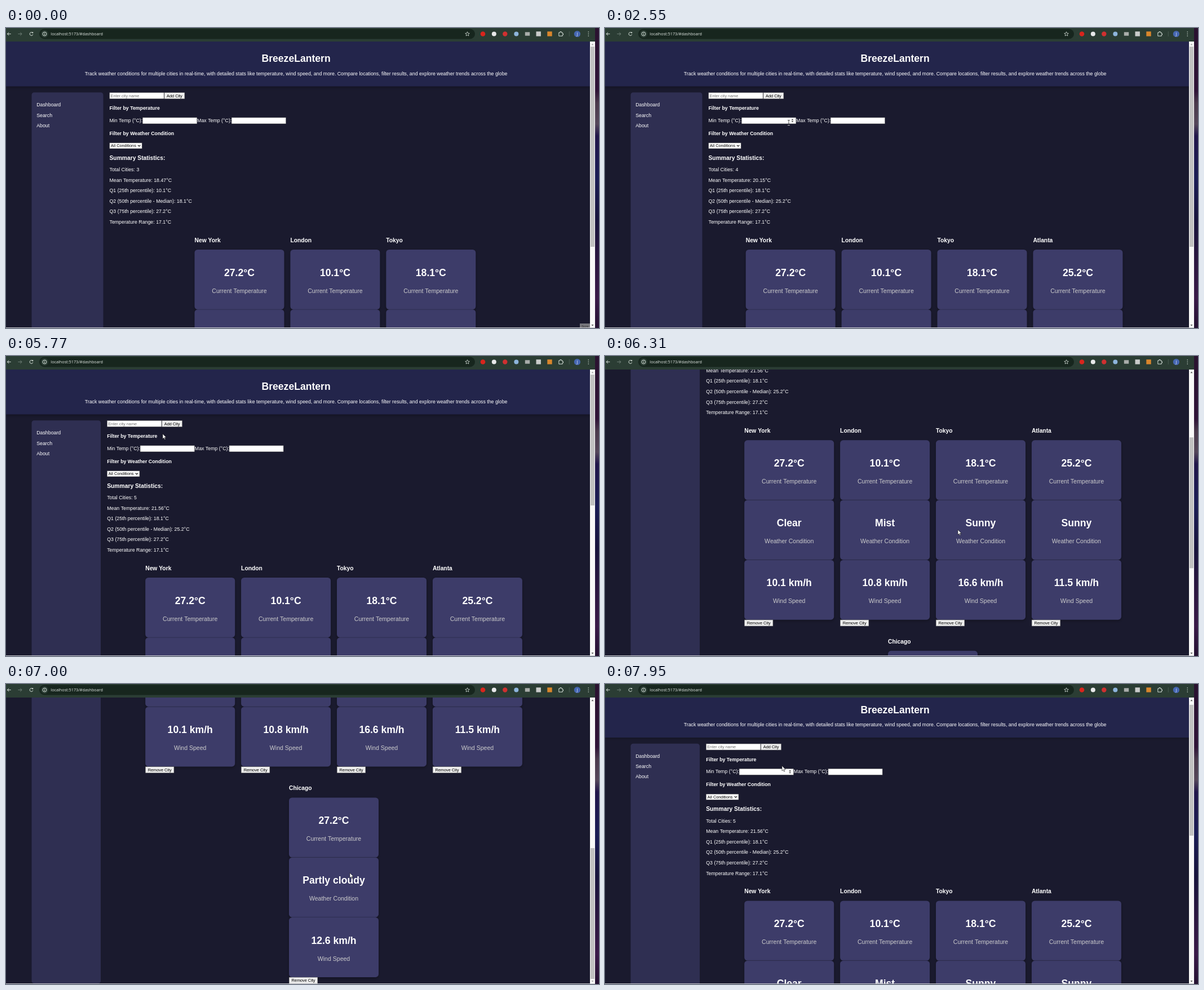
These frames come from a looping animation (1052 by 532 pixels, 8 s). An HTML page with a canvas:

```html
<!DOCTYPE html>
<html lang="en">
<head>
<meta charset="utf-8">
<title>Weather dashboard</title>
<style>
html, body { margin: 0; width: 100%; height: 100%; overflow: hidden; background: #1a1a2e; }
canvas { display: block; width: 1052px; height: 532px; }
</style>
</head>
<body>
<canvas id="stage"></canvas>
<script>
const W = 1052, H = 532, LOOP = 8000, TOP = 24, PAGE_W = 1036;
const canvas = document.getElementById('stage');
const ctx = canvas.getContext('2d');
const dpr = window.devicePixelRatio || 1;
canvas.width = W * dpr;
canvas.height = H * dpr;

const SANS = '"Liberation Sans", Arial, sans-serif';
const UI = '"Open Sans", "Noto Sans", sans-serif';

const cities = [
  ['New York', '27.2°C', 'Clear', '10.1 km/h'],
  ['London', '10.1°C', 'Mist', '10.8 km/h'],
  ['Tokyo', '18.1°C', 'Sunny', '16.6 km/h'],
  ['Atlanta', '25.2°C', 'Sunny', '11.5 km/h'],
  ['Chicago', '27.2°C', 'Partly cloudy', '12.6 km/h']
];
const labels = ['Current Temperature', 'Weather Condition', 'Wind Speed'];
const layouts = {
  3: { left: 183.5, side: 127, cards: 334.5, mean: '18.47', q1: '10.1', q2: '18.1', thumb: 355 },
  4: { left: 183.5, side: 127, cards: 249.7, mean: '20.15', q1: '18.1', q2: '25.2', thumb: 355 },
  5: { left: 179.2, side: 122.5, cards: 247.2, mean: '21.56', q1: '18.1', q2: '25.2', thumb: 232 }
};

// Screen refreshes come in bursts: [start, end, steps]
const bursts = [[70, 830, 12], [900, 1240, 5], [2160, 2550, 4], [2950, 3010, 2],
  [3150, 3910, 12], [4980, 5370, 4], [5770, 6510, 12], [6580, 7000, 7], [7270, 7950, 11]];
const scrollKeys = [[5820, 0], [6308, 243.6], [6510, 380], [6580, 420], [7000, 565], [7230, 565],
  [7542, 290.5], [7950, 8.5]];
const cursorKeys = [[0, 1030, 540], [70, 1012, 500], [480, 520, 250], [760, 232, 119], [830, 236, 121],
  [900, 245, 124], [1070, 380, 150], [1240, 326, 168], [2900, 326, 168], [2950, 365, 174],
  [3010, 428, 178], [3150, 420, 160], [3357, 330, 12], [3495, 265, 14], [3702, 235, 118],
  [3771, 238, 120], [3910, 278, 138], [5770, 278, 138], [6308, 626, 308], [6510, 622, 318],
  [7000, 610, 335], [7230, 610, 335], [7542, 575, 339], [7746, 450, 260], [7950, 314, 145]];
const typing = [[0, ''], [1380, 'a'], [1640, 'at'], [1770, 'atl'], [1900, 'atla'], [2160, ''],
  [4240, 'c'], [4330, 'ch'], [4420, 'chi'], [4840, 'chic'], [4980, '']];

function held(t) {
  let h = 0;
  for (const [start, end, n] of bursts) {
    if (t < start) break;
    const gap = (end - start) / (n - 1);
    h = start + gap * Math.min(n - 1, Math.floor((t - start) / gap + 1e-6));
  }
  return h;
}

function at(keys, t, i = 1) {
  let a = keys[0];
  for (const b of keys) {
    if (t < b[0]) {
      return b === a ? a[i] : a[i] + (b[i] - a[i]) * (t - a[0]) / (b[0] - a[0]);
    }
    a = b;
  }
  return a[i];
}

const last = (keys, t) => keys.filter(k => k[0] <= t).pop()[1];

function text(s, x, y, size = 8.8, color = '#fff', weight = 400, align = 'left', family = SANS) {
  ctx.font = `${weight} ${size}px ${family}`;
  ctx.fillStyle = color;
  ctx.textAlign = align;
  ctx.fillText(s, x, y);
}

function rect(x, y, w, h, color) {
  ctx.fillStyle = color;
  ctx.fillRect(x, y, w, h);
}

function round(x, y, w, h, r, color) {
  ctx.fillStyle = color;
  ctx.beginPath();
  ctx.roundRect(x, y, w, h, r);
  ctx.fill();
}

function disc(x, y, r, color) {
  ctx.fillStyle = color;
  ctx.beginPath();
  ctx.arc(x, y, r, 0, Math.PI * 2);
  ctx.fill();
}

function line(points, color, width = 1, close = false) {
  ctx.strokeStyle = color;
  ctx.lineWidth = width;
  ctx.beginPath();
  points.forEach(([x, y]) => ctx.lineTo(x, y));
  if (close) ctx.closePath();
  ctx.stroke();
}

function ring(x, y, r, color, from = 0, to = Math.PI * 2) {
  ctx.strokeStyle = color;
  ctx.lineWidth = 1;
  ctx.beginPath();
  ctx.arc(x, y, r, from, to);
  ctx.stroke();
}

function triangle(x, y, w, h, color) {
  ctx.fillStyle = color;
  ctx.beginPath();
  ctx.moveTo(x - w, y);
  ctx.lineTo(x + w, y);
  ctx.lineTo(x, y + h);
  ctx.fill();
}

function shadow(color, blur, dy) {
  ctx.shadowColor = color;
  ctx.shadowBlur = blur * dpr;
  ctx.shadowOffsetY = dy * dpr;
}

function box(x, y, w, h, fill = '#fff') {
  rect(x, y, w, h, '#767676');
  rect(x + .6, y + .6, w - 1.2, h - 1.2, fill);
}

function button(s, x, y, w, h = 11.5) {
  box(x, y, w, h, '#efefef');
  text(s, x + w / 2, y + 8.4, 7.33, '#000', 400, 'center');
}

function card(x, y, value, label) {
  shadow('rgba(0,0,0,.3)', 5, 2);
  round(x, y, 159, 106, 5.5, '#3d3c69');
  shadow('transparent', 0, 0);
  text(value, x + 79.5, y + 46.7, 17.6, '#fff', 700, 'center');
  text(label, x + 79.5, y + 76.7, 10.56, '#ccc', 400, 'center');
}

function cityColumn(city, x, y) {
  text(city[0], x, y, 10.3, '#fff', 700);
  labels.forEach((label, i) => card(x, y + 13.2 + i * 106.2, city[i + 1], label));
  button('Remove City', x, y + 331.6, 51);
}

function page(count, scroll, cur, typed, focused) {
  const lay = layouts[count], x = lay.left;
  ctx.save();
  ctx.beginPath();
  ctx.rect(0, TOP, PAGE_W, H - TOP);
  ctx.clip();
  rect(0, TOP, PAGE_W, H, '#1a1a2e');
  ctx.translate(0, -scroll);

  shadow('rgba(0,0,0,.25)', 5, 2);
  rect(0, TOP, PAGE_W, 79.5, '#23254b');
  shadow('transparent', 0, 0);
  text('BreezeLantern', 514.6, 60, 17.6, '#fff', 700, 'center');
  text('Track weather conditions for multiple cities in real-time, with detailed stats like temperature, ' +
    'wind speed, and more. Compare locations, filter results, and explore weather trends across the globe',
    514.6, 83.6, 8.8, '#fff', 400, 'center');

  round(45.5, 114.3, lay.side, count === 5 ? 981.7 : 600, 4.5, '#2f2f52');
  ['Dashboard', 'Search', 'About'].forEach((s, i) => text(s, 54.2, 139.4 + i * 18.1));

  if (focused) round(x - 1, 113.3, 99, 13.2, 1.5, '#fff');
  box(x, 114.3, 97, 11.4);
  text(typed || 'Enter city name', x + 2, 122.6, 7.33, typed ? '#000' : '#757575');
  button('Add City', x + 97.2, 114.3, 36.4);

  text('Filter by Temperature', x, 145, 8.8, '#fff', 700);
  text('Min Temp (°C):', x, 166.8);
  box(x + 58.7, 158.6, 96.8, 11.4);
  text('Max Temp (°C):', x + 155.6, 166.8);
  box(x + 216.5, 158.6, 96.8, 11.4);
  const cy = cur.y + scroll;
  if (cur.x > x + 59 && cur.x < x + 155 && cy > 152 && cy < 170) {
    triangle(x + 149, 163.4, 1.9, -2.3, '#444');
    triangle(x + 149, 165, 1.9, 2.3, '#444');
  }

  text('Filter by Weather Condition', x, 189.9, 8.8, '#fff', 700);
  box(x, 203.5, 58, 10.6);
  text('All Conditions', x + 2.5, 211.4, 7.33, '#000');
  line([[x + 50.5, 207.6], [x + 52.7, 209.8], [x + 54.9, 207.6]], '#000', 1.1);

  text('Summary Statistics:', x, 233.7, 10.3, '#fff', 700);
  [`Total Cities: ${count}`, `Mean Temperature: ${lay.mean}°C`, `Q1 (25th percentile): ${lay.q1}°C`,
    `Q2 (50th percentile - Median): ${lay.q2}°C`, 'Q3 (75th percentile): 27.2°C',
    'Temperature Range: 17.1°C'].forEach((s, i) => text(s, x, 254 + i * 18.6));

  cities.slice(0, count).forEach((city, i) => {
    if (i < 4) cityColumn(city, lay.cards + i * 169.9, 379.8);
    else cityColumn(city, 502, 753.3);
  });
  ctx.restore();

  rect(PAGE_W, TOP, 9, H - TOP, '#f8f8f8');
  rect(PAGE_W + 1, 33 + scroll / 565 * 258, 7, lay.thumb, '#c1c1c1');
  triangle(1040.5, 30.2, 2, -2.4, scroll ? '#505050' : '#a3a3a3');
  triangle(1040.5, 526, 2, 2.4, scroll > 564 ? '#a3a3a3' : '#505050');
  rect(0, 531, 1045, 1, '#c5c6cc');
}

function toolbar(hover) {
  const ink = '#d5ded8', dim = '#708078';
  rect(0, 0, 1046, TOP, '#2b3d34');
  round(59, 1.5, 773, 18, 9, hover ? '#24332b' : '#17261e');
  line([[8.6, 10.5], [2.5, 10.5]], ink);
  line([[5.2, 7.6], [2.3, 10.5], [5.2, 13.4]], ink);
  line([[21.4, 10.5], [27.8, 10.5]], dim);
  line([[25.2, 7.6], [28.1, 10.5], [25.2, 13.4]], dim);
  ring(45, 10.5, 2.9, ink, .3, 5.5);
  rect(46.2, 7.2, 2, 2, ink);
  disc(68.5, 10.5, 6.5, '#2b3d34');
  ring(68.5, 10.5, 3.4, ink);
  rect(68, 10, 1, 2.4, ink);
  rect(68, 8.3, 1, 1, ink);
  text('localhost:5173/#dashboard', 79.3, 13.2, 7.25, '#e6ece8', 400, 'left', UI);

  const star = [];
  for (let i = 0; i < 10; i++) {
    const r = i % 2 ? 1.8 : 4, a = i * Math.PI / 5 - Math.PI / 2;
    star.push([818.5 + r * Math.cos(a), 10.7 + r * Math.sin(a)]);
  }
  line(star, ink, .8, true);

  disc(846, 10.5, 4.3, '#d9251d');
  disc(865.8, 10.5, 4, '#e8e9ea');
  disc(885.3, 10.5, 4.2, '#cf3030');
  disc(905.3, 10.5, 4, '#8db4dc');
  rect(920.8, 7.3, 8.4, 6.4, '#a9adab');
  rect(940.5, 6.2, 8.4, 8.4, '#c9cbca');
  rect(960.3, 6.2, 8.4, 8.4, '#d9862c');
  line([[980.8, 8], [983, 8], [983, 6.6], [985.2, 6.6], [985.2, 8], [987.2, 8], [987.2, 10],
    [988.5, 10], [988.5, 12], [987.2, 12], [987.2, 14.2], [980.8, 14.2]], ink, 1, true);
  rect(998.8, 6, .8, 9, '#50635a');
  disc(1013.4, 10.5, 5.6, '#4667b2');
  text('J', 1013.4, 13, 6.6, '#fff', 400, 'center', UI);
  [7, 10.5, 14].forEach(y => disc(1033.3, y, .8, ink));
}

function desktop() {
  const g = ctx.createLinearGradient(0, 0, 0, H);
  [[0, '#2a1230'], [.21, '#301438'], [.25, '#4a3a4c'], [.32, '#55475a'], [.36, '#21164a'],
    [.5, '#1b1d55'], [.64, '#18143c'], [.78, '#2c1740'], [.9, '#3a1a48'], [1, '#251232']]
    .forEach(([p, c]) => g.addColorStop(p, c));
  rect(1045, 0, 7, H, g);
}

function pointer(x, y, beam) {
  if (beam) {
    line([[x - 2, y - 4.5], [x + 2, y - 4.5]], '#333', .8);
    line([[x, y - 4.5], [x, y + 4.5]], '#333', .9);
    line([[x - 2, y + 4.5], [x + 2, y + 4.5]], y > 165 ? '#ddd' : '#333', .8);
    return;
  }
  ctx.beginPath();
  [[0, 0], [0, 9], [2.1, 7.1], [3.5, 10.3], [4.9, 9.7], [3.5, 6.6], [6.2, 6.4]]
    .forEach(([dx, dy]) => ctx.lineTo(x + dx, y + dy));
  ctx.closePath();
  ctx.fillStyle = '#fff';
  ctx.fill();
  ctx.strokeStyle = '#111';
  ctx.lineWidth = .6;
  ctx.stroke();
}

function draw(t) {
  const h = held(t);
  const count = t < 2290 ? 3 : t < 5110 ? 4 : 5;
  const scroll = at(scrollKeys, h);
  const cur = { x: at(cursorKeys, h), y: at(cursorKeys, h, 2) };
  const focused = (t >= 760 && t < 2160) || (t >= 3771 && t < 4980);
  const dx = cur.x - layouts[count].left, py = cur.y + scroll;
  const inField = (left, top) => dx > left && dx < left + 97 && py > top && py < top + 11.4;
  const overBar = cur.y < 20;

  ctx.setTransform(dpr, 0, 0, dpr, 0, 0);
  page(count, scroll, cur, last(typing, t), focused);
  toolbar(overBar);
  desktop();
  if (t < 70) {
    rect(1018, 524, 18, 7, '#77777d');
    text('Scre', 1021, 531, 6, '#333');
  }
  pointer(cur.x, cur.y, overBar || inField(0, 114.3) || inField(58.7, 158.6) || inField(216.5, 158.6));
}

const began = performance.now();
function tick() {
  draw((performance.now() - began) % LOOP);
  requestAnimationFrame(tick);
}
tick();
</script>
</body>
</html>
```
